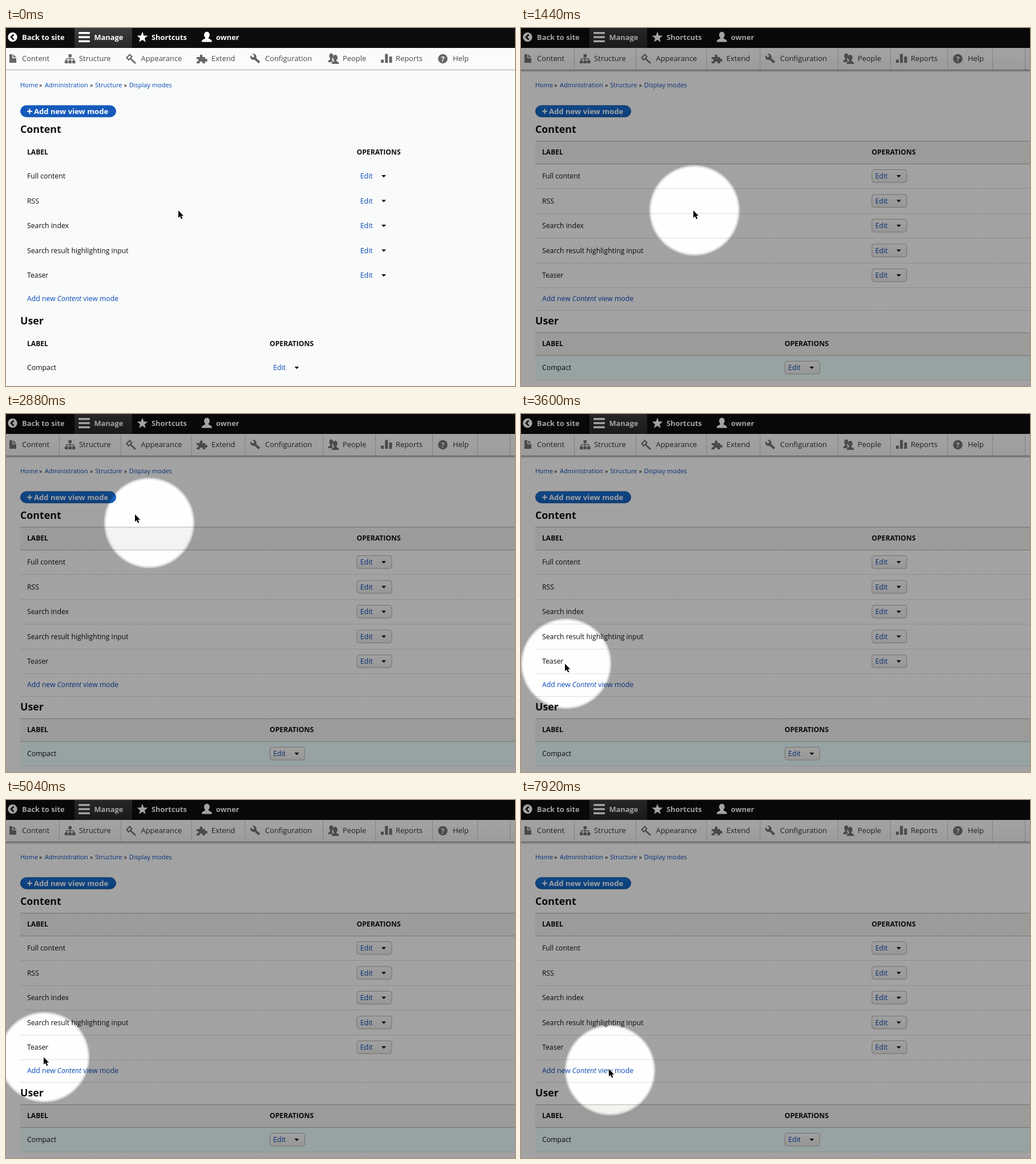
Animation of 892 by 628 pixels, one loop 8000 ms. Source, as an HTML page with a canvas:

```html
<!DOCTYPE html>
<html lang="en">
<head>
<meta charset="utf-8">
<title>Display modes</title>
<style>
  html, body { margin: 0; width: 100%; height: 100%; overflow: hidden; background: #f9fbfa; }
  canvas { display: block; }
</style>
</head>
<body>
<canvas id="stage" width="892" height="628"></canvas>
<script>
const ctx = document.getElementById('stage').getContext('2d');
const W = 892, H = 628, LOOP = 8000, SHADE = 0.36;
const LINK = '#0a49b8', INK = '#0f0d12', BODY = 12.28;

// start time, spotlight centre, pointer offset from it, shade
const STEPS = [
  [0, 304, 320, -2, 0, 0],
  [1080, 304, 320, -2, 0, SHADE / 2],
  [1440, 304, 320, -2, 0],
  [1800, 262, 237, -6, -8],
  [2160, 263, 238, -2, -1],
  [2520, 251, 210, -4, -6],
  [2880, 251, 191, -25, -15],
  [3240, 104, 177, -8, 0],
  [3600, 79, 438, -2, 0],
  [4320, 76, 223, -4, 20],
  [4680, 82, 340, -2, 10],
  [5040, 67, 451, -1, 0],
  [5400, 162, 472, -1, 0],
  [5760, 81, 423, -1, 2],
  [6120, 156, 478, -2, 0],
  [6480, 156, 477, -3, -1],
  [7560, 156, 478, -3, -1],
  [7920, 156, 474, -2, -2]
];

function text(str, x, y, size, color, style = '400') {
  ctx.font = `${style} ${size}px "Open Sans", "Noto Sans", sans-serif`;
  ctx.fillStyle = color;
  ctx.fillText(str, x, y);
  return x + ctx.measureText(str).width;
}

function rect(x, y, w, h, color) {
  ctx.fillStyle = color;
  ctx.fillRect(x, y, w, h);
}

function round(x, y, w, h, r, fill, stroke) {
  ctx.beginPath();
  ctx.roundRect(x, y, w, h, r);
  ctx.fillStyle = fill;
  ctx.fill();
  if (stroke) {
    ctx.lineWidth = 1;
    ctx.strokeStyle = stroke;
    ctx.stroke();
  }
}

function fade(y0, y1, a, b) {
  const g = ctx.createLinearGradient(0, y0, 0, y1);
  g.addColorStop(0, a);
  g.addColorStop(1, b);
  return g;
}

function disc(x, y, r, color, ry = r) {
  ctx.beginPath();
  ctx.ellipse(x, y, r, ry, 0, 0, Math.PI * 2);
  ctx.fillStyle = color;
  ctx.fill();
}

function shape(d, color, x = 0, y = 0) {
  ctx.save();
  ctx.translate(x, y);
  ctx.fillStyle = color;
  ctx.fill(new Path2D(d));
  ctx.restore();
}

function line(d, color, width) {
  ctx.strokeStyle = color;
  ctx.lineWidth = width;
  ctx.stroke(new Path2D(d));
}

function star(x, y, r, color) {
  ctx.beginPath();
  for (let i = 0; i < 10; i++) {
    const a = -Math.PI / 2 + i * Math.PI / 5, k = i % 2 ? r * 0.42 : r;
    ctx.lineTo(x + k * Math.cos(a), y + k * Math.sin(a));
  }
  ctx.fillStyle = color;
  ctx.fill();
}

function topBar() {
  const c = '#fff';
  rect(0, 0, W, 35, '#0d0d0d');
  rect(120, 0, 101, 35, fade(0, 35, '#3c3c3c', '#282828'));

  disc(11.5, 16, 8.2, c);
  line('M13.5 11.5L9 16L13.5 20.5', '#0d0d0d', 2.6);
  for (const y of [7, 14.3, 21.6]) round(127, y, 20, 3.4, 1, c);
  star(239, 16.6, 10, c);
  disc(352, 12.2, 4.9, c, 5.8);
  shape('M349 15H355V18.5C358 20 361 20.5 361 24.5H343C343 20.5 346 20 349 18.5Z', c);

  const items = [['Back to site', 28], ['Manage', 154.5], ['Shortcuts', 255], ['owner', 368]];
  for (const [name, x] of items) text(name, x, 20.5, 12.85, c, '700');
}

function trayIcons(c, bg) {
  shape('M6 46H11V53H18V61H6ZM12.5 46L18 51.5H12.5Z', c);

  for (const x of [103, 109.5, 116]) rect(x, 57, 5.5, 5, c);
  rect(109.5, 46, 5.5, 5, c);
  line('M112.2 51V57M105.7 57V54H118.7V57', c, 1.5);

  shape('M210 52L217 45L222 50.5L215 57.5Z', c);
  shape('M213 52L217 48L219 50.5L215 54.5Z', bg);
  line('M218.5 54L227 62', c, 2.8);

  shape('M334 51H340C337.5 45 346.5 45 344 51H349V54.5C354.5 52 354.5 61 349 58.5V62H344.5C346 57.5 338 57.5 339.5 62H334V58.5C338.5 60 338.5 53 334 54.5Z', c);

  line('M434 51.5L444 60.5', c, 4.2);
  disc(433.5, 50.5, 5.4, c);
  shape('M427 46L430 43.5L435.5 49L432.5 52Z', bg);

  disc(577, 52, 4, c, 5);
  shape('M575 55H579V58C582 59 583.5 60 583.5 63H570.5C570.5 60 573 59 575 58Z', c);
  disc(570, 49, 3.6, c, 4.6);
  shape('M568 52H571.5V56L573 58L569.5 60H564.5C564.5 57 566 56 568 55.5Z', c);

  rect(657, 55.5, 5, 5.5, c);
  rect(664.2, 45.5, 5, 15.5, c);
  rect(671.5, 50, 5, 11, c);

  disc(765.5, 54, 8.3, c);
  text('?', 762.4, 59, 13, bg, '700');
}

function tray(lined) {
  rect(0, 35, W, 38, lined ? fade(35, 73, '#ffffff', '#f3f3f3') : '#fafbfa');
  if (lined) {
    for (const x of [93, 201, 324.5, 418.5, 555, 647, 747, 826, 883]) rect(x, 36, 1, 37, '#c9c9c9');
    rect(0, 74, W, 4, fade(74, 78, 'rgba(0,0,0,.28)', 'rgba(0,0,0,0)'));
  }
  rect(0, 73, W, 1, lined ? '#909090' : '#a0a0a0');
  trayIcons(lined ? '#747474' : '#666', '#fafafa');
  const items = [['Content', 28], ['Structure', 128], ['Appearance', 236.5], ['Extend', 360],
    ['Configuration', 454], ['People', 590], ['Reports', 683], ['Help', 783]];
  for (const [name, x] of items) text(name, x, 58, 12.9, lined ? '#303030' : '#484848');
}

function editButton(x, y, lined) {
  if (lined) round(x + 0.5, y - 11, 61, 22.5, 4, fade(y - 11, y + 11, '#fbfbfa', '#ececea'), '#b0b0b0');
  text('Edit', x + 6.3, y + 4.5, BODY, LINK);
  shape('M0 0H8L4 4.2Z', INK, x + 43.5, y - 1.5);
}

function table(title, top, opsX, rows, lined) {
  text(title, 25, top - 14, 17.8, INK, '700');
  if (lined) {
    rect(25, top, W, 40, '#f3f3f1');
    rect(25, top, W, 1, '#b4b4b0');
    rect(25, top + 40, W, 1, '#b4b4b0');
  }
  text('LABEL', 37, top + 24, 12.1, INK, '700');
  text('OPERATIONS', opsX, top + 24, 12.2, INK, '700');
  rows.forEach((name, i) => {
    const y = top + 61.5 + i * 43.5;
    text(name, 37, y + 4.5, BODY, INK);
    editButton(opsX, y, lined);
    if (lined) rect(25, Math.round(y + 21.5), W, 1, '#dededb');
  });
}

function addButton(lined) {
  const fill = lined ? fade(135, 157, '#1a70d2', '#1260be') : '#155abb';
  round(25.5, 136, 167, 20, 10, fill, lined ? '#10529f' : '#155abb');
  rect(37, 145.2, 9, 2, '#fff');
  rect(40.5, 141.7, 2, 9, '#fff');
  text('Add new view mode', 49, 150.5, 13.1, '#fff', '700');
}

function page(lined) {
  rect(0, 0, W, H, lined ? '#fefefe' : '#f9fbfa');
  topBar();
  tray(lined);

  const crumbs = [['Home', 25, 58], ['Administration', 68, 147], ['Structure', 156, 206.5], ['Display modes', 215.7]];
  for (const [name, x, sep] of crumbs) {
    text(name, x, 103.5, 11, LINK);
    if (sep) text('»', sep, 103.5, 11, INK);
  }
  addButton(lined);

  if (lined) rect(25, 575, W, 42, '#ecfefd');
  const contentRows = ['Full content', 'RSS', 'Search index', 'Search result highlighting input', 'Teaser'];
  table('Content', 198, 614.5, contentRows, lined);
  let x = text('Add new ', 37, 479, BODY, LINK);
  x = text('Content', x, 479, BODY, LINK, 'italic 400');
  text(' view mode', x, 479, BODY, LINK);
  if (lined) rect(25, 495, W, 1, '#dededb');
  table('User', 534, 462, ['Compact'], lined);
}

function spotlight(x, y, alpha) {
  const g = ctx.createRadialGradient(x, y, 74.5, x, y, 80.5);
  g.addColorStop(0, 'rgba(0,0,0,0)');
  g.addColorStop(0.5, `rgba(0,0,0,${alpha * 0.35})`);
  g.addColorStop(1, `rgba(0,0,0,${alpha})`);
  rect(0, 0, W, H, g);
}

function pointer(x, y) {
  const d = 'M0 0V13L3 10.3L5.2 15.2L7.4 14.2L5.2 9.5H9.2Z';
  ctx.save();
  ctx.translate(x, y);
  ctx.lineJoin = 'round';
  line(d, '#fff', 1.6);
  ctx.restore();
  shape(d, '#050505', x, y);
}

function draw(now) {
  const t = now % LOOP;
  const [, x, y, dx, dy, shade = SHADE] = STEPS.findLast(s => s[0] <= t) || STEPS[0];
  page(shade > 0);
  if (shade > 0) spotlight(x, y, shade);
  pointer(x + dx, y + dy);
  requestAnimationFrame(draw);
}

requestAnimationFrame(draw);
</script>
</body>
</html>
```
